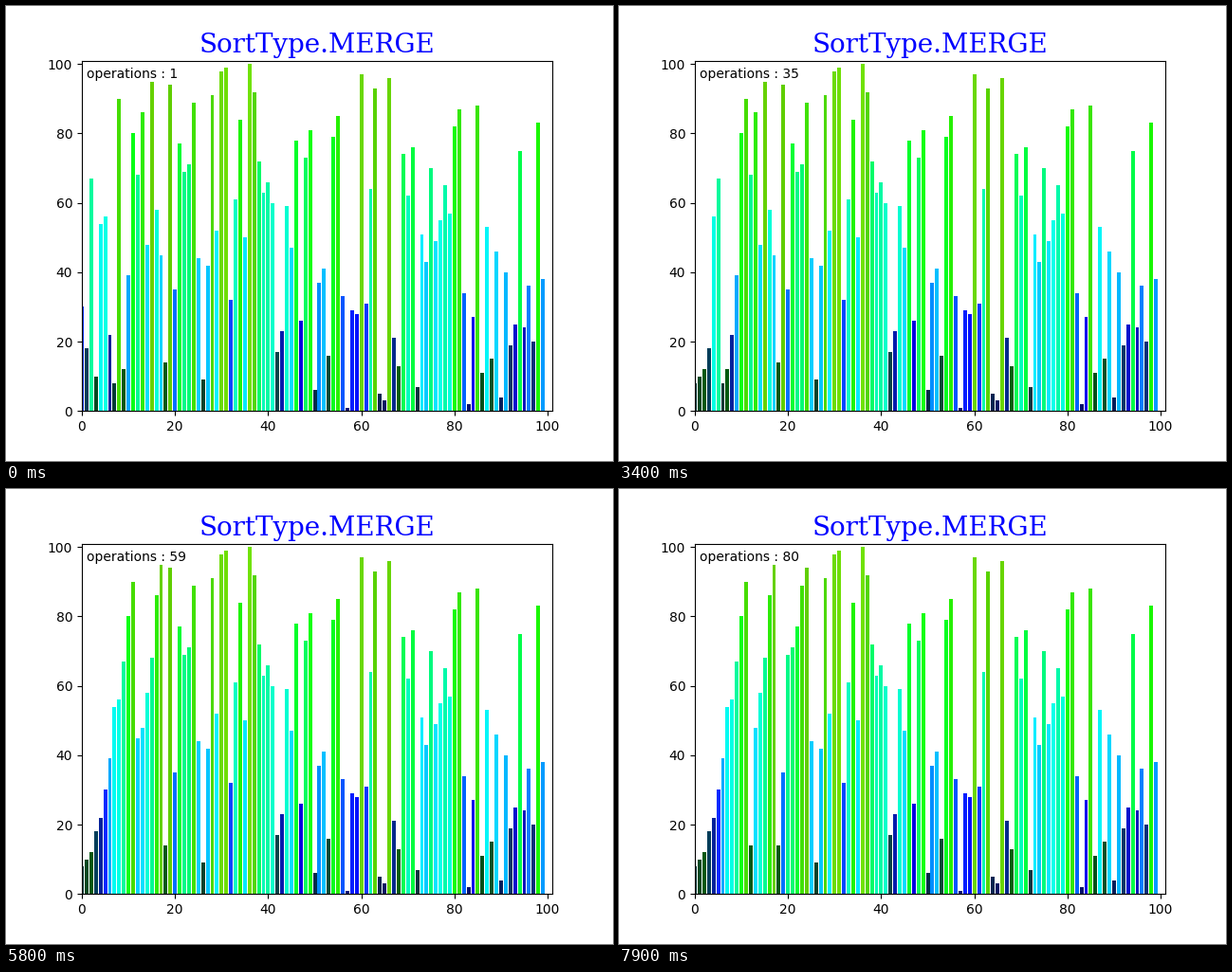
A matplotlib script for the animation above (8 s loop, 640x480 px).

```python
import matplotlib.pyplot as plt
import numpy as np
from matplotlib.animation import FuncAnimation

FRAMES = 80
INTERVAL = 100

START = [
    30, 18, 67, 10, 54, 56, 22, 8, 90, 12, 39, 80, 68, 86, 48, 95, 58, 45, 14, 94,
    35, 77, 69, 71, 89, 44, 9, 42, 91, 52, 98, 99, 32, 61, 84, 50, 100, 92, 72, 63,
    66, 60, 17, 23, 59, 47, 78, 26, 73, 81, 6, 37, 41, 16, 79, 85, 33, 1, 29, 28,
    97, 31, 64, 93, 5, 3, 96, 21, 13, 74, 62, 76, 7, 51, 43, 70, 49, 55, 65, 57,
    82, 87, 34, 2, 27, 88, 11, 53, 15, 46, 4, 40, 19, 25, 75, 24, 36, 20, 83, 38,
]


def merge_sort(a, lo, hi):
    """Sort a[lo:hi] in place, yielding a copy after every write."""
    if hi - lo < 2:
        return
    mid = (lo + hi) // 2
    yield from merge_sort(a, lo, mid)
    yield from merge_sort(a, mid, hi)
    for k, value in enumerate(sorted(a[lo:hi]), start=lo):
        a[k] = value
        yield a.copy()


# The display runs one write ahead of the counter.
states = list(merge_sort(START.copy(), 0, len(START)))[1:FRAMES + 1]

plt.rcParams["font.family"] = "DejaVu Sans"
fig, ax = plt.subplots(figsize=(6.4, 4.8), dpi=100)
cmap = plt.get_cmap("gist_ncar")

n = len(START)
bars = ax.bar(range(n), START)
ax.set_xlim(0, 1.01 * n)
ax.set_ylim(0, 1.01 * n)
ax.set_title("SortType.MERGE", family="DejaVu Serif", color="blue", size=20)
counter = ax.text(0.01, 0.95, "", transform=ax.transAxes)


def update(frame):
    values = states[frame]
    # Integer input picks colormap entries directly.
    for bar, value, color in zip(bars, values, cmap(np.array(values))):
        bar.set_height(value)
        bar.set_color(color)
        bar.set_linewidth(0)
    counter.set_text(f"operations : {frame + 1}")
    return [*bars, counter]


anim = FuncAnimation(fig, update, frames=FRAMES, interval=INTERVAL, repeat=True)
plt.show()
```
